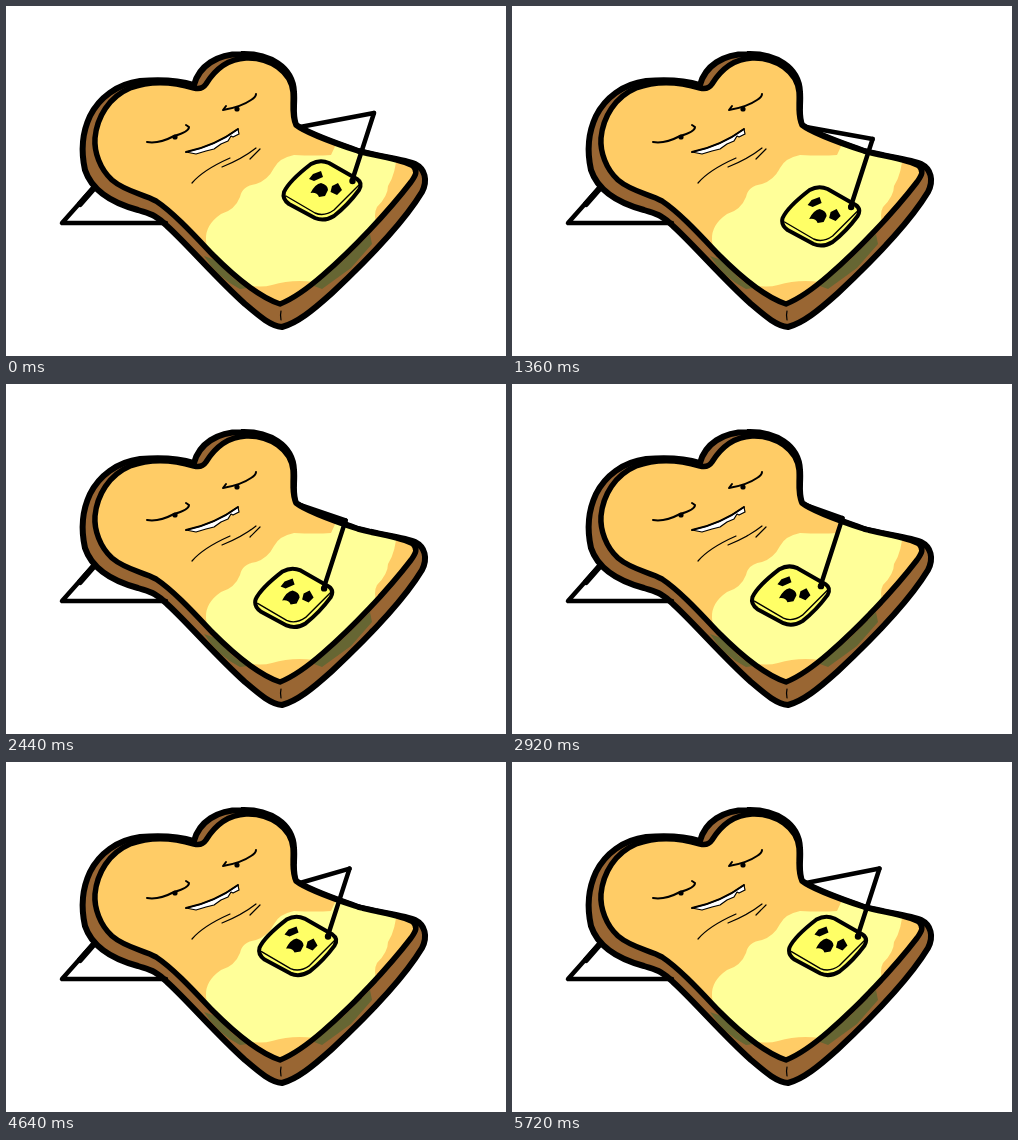
An HTML page for the animation above (5760 ms loop, 500 px wide and 350 px high).

```html
<!DOCTYPE html>
<html lang="en">
<head>
<meta charset="utf-8">
<title>Buttering toast</title>
<style>
  html, body { margin: 0; width: 100%; height: 100%; overflow: hidden; background: #fff; }
  svg { display: block; width: 500px; height: 350px; }
  .ink { fill: none; stroke: #000; stroke-linecap: round; stroke-linejoin: round; }
</style>
</head>
<body>
<svg viewBox="0 0 500 350">
  <defs>
    <path id="face" d="M188 82Q196 84 200 78C208 65 220 53 240 52C264 51 285 66 287 86C288 98 285 108 290 119C300 127 325 136 352 145C374 151 396 153 407 160C412 165 410 169 405 176C382 206 346 244 317 269C301 283 289 292 274 298C253 291 229 271 207 249C188 229 168 207 150 195C138 188 120 186 106 174C94 163 88 146 89 132C91 111 103 91 124 82C145 74 168 76 188 82Z"/>
    <clipPath id="inside"><use href="#face"/></clipPath>
    <path id="crust" d="M188 79C193 60 211 48 235 48C263 47 287 61 288 86C289 99 286 108 290 119C303 128 330 137 352 145C375 151 398 153 409 158C419 163 422 174 416 186C396 219 357 258 326 287C306 305 291 317 276 321C264 320 252 309 239 298C210 272 181 238 161 220C149 208 144 208 132 204C106 197 86 185 79 164C75 146 76 127 84 110C93 92 111 78 134 75C157 73 175 75 188 79Z"/>
    <clipPath id="edge"><use href="#crust"/></clipPath>
  </defs>

  <use href="#crust" fill="#963"/>
  <g clip-path="url(#edge)" fill="#663">
    <path d="M198 250L212 255Q225 274 242 282L234 283Q212 272 198 250Z"/>
    <path d="M308 280L338 254L364 228L366 238L345 262L316 283Z"/>
  </g>
  <use href="#crust" class="ink" stroke-width="6"/>
  <use href="#face" fill="#fc6"/>
  <path clip-path="url(#inside)" fill="#ff9" d="M325 149Q310 150 288 149Q273 152 268 162Q262 174 250 178Q236 180 234 191Q229 204 215 208Q199 219 200 234Q200 246 210 257Q224 275 240 279Q255 282 266 279Q286 273 308 276L330 290L371 221Q367 208 371 201Q382 190 382 180Q390 168 391 145L332 134Z"/>
  <use href="#face" class="ink" stroke-width="5.5"/>

  <g class="ink">
    <path stroke-width="1.2" d="M275 305Q274 309 275 314"/>
    <path stroke-width="2" d="M141 136Q153 138 168 130Q183 126 183 121L180 119M220 100L217 104Q235 101 245 94Q250 91 250 88"/>
    <path stroke-width="1.2" d="M186 177Q197 164 224 152M216 161Q236 153 250 142M244 153L254 143"/>
    <path stroke-width="4.5" d="M88 181L56 217H160"/>
    <path stroke-width="6" d="M88 182L74 198"/>
    <path style="fill:#fff" stroke-width="1.2" d="M180 146Q209 140 232 123L233 128L227 131L225 130L222 135L215 138L208 143L200 145L190 148Z"/>
    <path stroke-width="2" d="M180 146Q209 140 232 123"/>
  </g>
  <circle cx="169" cy="131" r="2.6"/>
  <circle cx="231" cy="103" r="2.6"/>

  <path id="arm" class="ink" stroke-width="4.5"/>
  <g id="butter">
    <path fill="#ff6" stroke="#000" stroke-width="4" stroke-linejoin="round" d="M278 186Q283 175 305 158Q314 153 323 157L351 173Q357 177 353 184Q342 199 328 210Q318 216 309 212L283 198Q276 193 278 186Z"/>
    <path class="ink" stroke-width="1.4" d="M280 190L309 207Q318 211 328 204L354 178"/>
    <path d="M303 173L307 168L315 165L317 171L308 175ZM324.500 186L326 180L332 177L336 184L331 189ZM304.500 187Q309 178 315 177Q322 179 322 184L319 190L313 191Q311 186 304.500 187Z"/>
    <path class="ink" stroke-width="4.5" d="M368 107L346 175"/>
    <circle cx="346.500" cy="175" r="3.2"/>
  </g>
</svg>
<script>
  const LOOP = 5760, STEP = 40;
  // Offsets of the butter along its closed rubbing path, evenly spaced in time
  const path = [
    [0, 0], [0.3, 9.5], [-2.5, 19], [-8.5, 27], [-16, 29.5], [-27.5, 29.5],
    [-37, 27.5], [-41, 21.5], [-38.5, 12], [-31, 3], [-21, -1.5], [-10.5, -2.5]
  ];
  const butter = document.getElementById('butter');
  const arm = document.getElementById('arm');

  function spline(a, b, c, d, u) {
    return b + u / 2 * (c - a + u * (2 * a - 5 * b + 4 * c - d + u * (3 * (b - c) + d - a)));
  }

  function offset(phase, axis) {
    const n = path.length, i = Math.floor(phase * n);
    const at = k => path[(i + k + n) % n][axis];
    return spline(at(-1), at(0), at(1), at(2), phase * n - i);
  }

  function draw(now) {
    const t = Math.floor(now % LOOP / STEP) * STEP;
    const x = offset(t / LOOP, 0), y = offset(t / LOOP, 1);
    butter.setAttribute('transform', `translate(${x} ${y})`);
    arm.setAttribute('d', `M294 121L${368 + x} ${107 + y}`);
  }

  const start = performance.now();
  function tick() {
    draw(performance.now() - start);
    requestAnimationFrame(tick);
  }
  tick();
</script>
</body>
</html>
```
